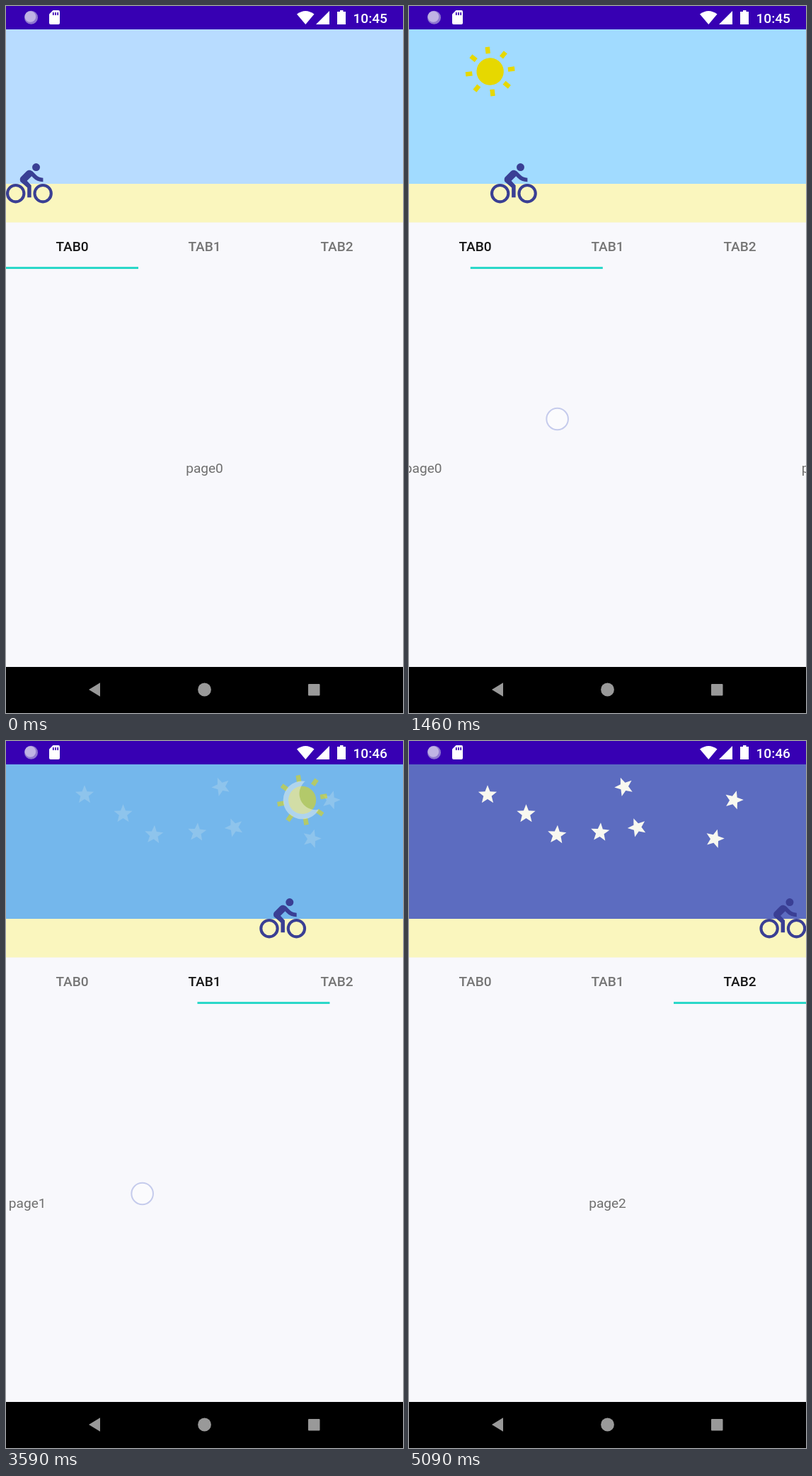
Recreate the animation shown at these times as an HTML page. Size 561 px wide and 998 px high, loop 5.14 s.

```html
<!DOCTYPE html>
<html lang="en">
<head>
<meta charset="utf-8">
<title>Tabs with a moving sky</title>
<style>
  html, body { margin: 0; width: 100%; height: 100%; overflow: hidden; background: #f8f8fc; }
  svg { display: block; width: 561px; height: 998px; }
  text { font: 400 19.1px Roboto, sans-serif; fill: #6f6f6f; text-anchor: middle; }
  .tab { font-weight: 500; fill: #757575; }
  .tab.on { fill: #161616; }
  #clock { font-weight: 500; fill: #fff; text-anchor: start; }
</style>
</head>
<body>
<svg viewBox="0 0 561 998">
  <defs>
    <clipPath id="skyClip"><rect y="33" width="561" height="218"/></clipPath>
    <mask id="crescent" maskUnits="userSpaceOnUse" x="-40" y="-40" width="80" height="80">
      <circle r="29.6" fill="#fff"/>
      <circle cx="-6.3" cy="-21.9" r="25" fill="#000"/>
    </mask>
  </defs>

  <rect width="561" height="998" fill="#f8f8fc"/>

  <g clip-path="url(#skyClip)">
    <rect id="sky" y="33" width="561" height="218"/>
    <g id="stars" fill="#f8f8f0"></g>
    <g id="orb">
      <g id="sun" fill="#e6d800"><circle r="21.5"/></g>
      <rect id="moon" x="-40" y="-40" width="80" height="80" fill="#f8f8f0" mask="url(#crescent)"/>
    </g>
  </g>
  <rect y="251" width="561" height="54.5" fill="#faf6be"/>

  <g id="bike" fill="#3a3f94">
    <circle cx="15.5" cy="3.5" r="2"/>
    <g fill="none" stroke="#3a3f94" stroke-width="1.5">
      <circle cx="5" cy="17" r="4.25"/>
      <circle cx="19" cy="17" r="4.25"/>
    </g>
    <path d="M10.8 10.5l2.4-2.4.8.8c1.3 1.3 3 2.1 5.1 2.1V9c-1.5 0-2.7-.6-3.6-1.5l-1.9-1.9c-.5-.4-1-.6-1.6-.6s-1.1.2-1.4.6L7.8 8.4c-.4.4-.6.9-.6 1.4 0 .6.2 1.1.6 1.4L11 14v5h2v-6.2z"/>
  </g>

  <g id="tabs"></g>
  <rect id="line" y="368.3" width="187" height="2.8" fill="#1ad5c5"/>
  <g id="pages"></g>
  <circle id="touch" r="15.3" fill="#fff" fill-opacity=".4" stroke="#c5cbec" stroke-width="2"/>

  <rect width="561" height="33" fill="#3700b3"/>
  <circle cx="35.5" cy="16.2" r="9.5" fill="#8f78d0"/>
  <circle cx="34.4" cy="15" r="7.8" fill="#c0b3e4"/>
  <path d="M66.5 6H74q2 0 2 2v16q0 2-2 2H63q-2 0-2-2V11.5z" fill="#fff"/>
  <path d="M66.8 9v4M70 9v4M73.2 9v4" stroke="#3700b3" stroke-width="1.7"/>
  <g fill="#fff">
    <path d="M411 11.5Q423.300 2.500 435.500 11.500L423.300 26z"/>
    <path d="M457 7v19h-19z"/>
    <path d="M472 6h4.500v2h3.500v18h-12V8h4z"/>
  </g>
  <text id="clock" x="490.500" y="24"></text>

  <rect y="933" width="561" height="65"/>
  <g fill="#999">
    <path d="M117 965l16-9.700v19.400z"/>
    <circle cx="280.500" cy="965" r="9.400"/>
    <rect x="427" y="957" width="16.500" height="16.500" rx="1"/>
  </g>
</svg>

<script>
const LOOP = 5140, MID = 280.5, WIDTH = 561, TAB = 187;
const $ = id => document.getElementById(id);
const mix = (a, b, k) => a + (b - a) * k;

function add(parent, tag, attrs, text = '') {
  const el = document.createElementNS('http://www.w3.org/2000/svg', tag);
  for (const k in attrs) el.setAttribute(k, attrs[k]);
  el.textContent = text;
  return parent.appendChild(el);
}

// Each swipe: drag start, page share at release, finger x and y
const DRAG = 500, SETTLE = 620;
const swipes = [
  { start: 1000, share: .52, x: 470, y: 583 },
  { start: 3130, share: .5, x: 443, y: 639 }
];

function swiped({ start, share }, t) {
  const u = (t - start) / DRAG;
  if (u <= 0) return 0;
  if (u < 1) return share * u ** 1.4;
  const v = Math.min(1, (t - start - DRAG) / SETTLE);
  return 1 - (1 - share) * (1 - v) ** 3;
}

// x, y, tilt
const starSpots = [
  [111, 76, 0], [165.5, 103, 0], [209, 132.5, 4], [270, 129, 4],
  [322.5, 122, -22], [304, 64.5, -22], [459, 83.5, 16], [432, 138, 16]
];
const starPoints = Array.from({ length: 10 }, (_, i) => {
  const r = i % 2 ? 6 : 13.8, a = i * Math.PI / 5;
  return `${(r * Math.sin(a)).toFixed(2)},${(-r * Math.cos(a)).toFixed(2)}`;
}).join(' ');
for (const [x, y, tilt] of starSpots)
  add($('stars'), 'polygon', { points: starPoints, transform: `translate(${x} ${y}) rotate(${tilt})` });

for (let i = 0; i < 8; i++)
  add($('sun'), 'rect', { x: -3.6, y: -39, width: 7.2, height: 10.5, transform: `rotate(${i * 45})` });

const tabs = [0, 1, 2].map(i => add($('tabs'), 'text', { x: (i + .5) * TAB, y: 346, class: 'tab' }, 'TAB' + i));
const pages = [0, 1, 2].map(i => add($('pages'), 'text', { y: 659 }, 'page' + i));

function skyColor(p, d, ease) {
  if (d < 0) return `rgb(${mix(184, 135, p)},${mix(220, 217, p)},255)`;
  return `rgb(${mix(135, 92, d)},${mix(217, 108, ease)},${mix(255, 192, ease)})`;
}

function draw(t) {
  const p = swipes.reduce((sum, s) => sum + swiped(s, t), 0);
  const d = p - 1, far = Math.abs(d), night = Math.max(0, d);
  const ease = far * far * (2 - far);

  $('sky').setAttribute('fill', skyColor(p, d, ease));
  $('stars').setAttribute('opacity', night * night);
  $('orb').setAttribute('transform',
    `translate(${MID + 309.5 * d} ${58 + 82 * ease}) rotate(${180 * d}) scale(${1 - .2 * far})`);
  $('sun').setAttribute('opacity', Math.min(1 - night, p * 20));
  $('moon').setAttribute('opacity', night);
  $('bike').setAttribute('transform', `translate(${247.7 * p} 218) scale(2.745)`);
  $('line').setAttribute('x', TAB * p);

  const current = swipes.filter(s => t >= s.start + DRAG).length;
  tabs.forEach((el, i) => el.classList.toggle('on', i === current));
  pages.forEach((el, i) => el.setAttribute('x', MID + (i - p) * WIDTH));

  const finger = swipes.find(s => t >= s.start - 80 && t < s.start + DRAG);
  $('touch').setAttribute('visibility', finger ? 'visible' : 'hidden');
  if (finger) {
    const slop = 12 * Math.min(1, Math.max(0, (finger.start - t) / 80));
    $('touch').setAttribute('cx', finger.x + slop - WIDTH * swiped(finger, t));
    $('touch').setAttribute('cy', finger.y);
  }
  $('clock').textContent = t < 2200 ? '10:45' : '10:46';
}

const begin = performance.now();
function tick() {
  draw((performance.now() - begin) % LOOP);
  requestAnimationFrame(tick);
}
tick();
</script>
</body>
</html>
```
